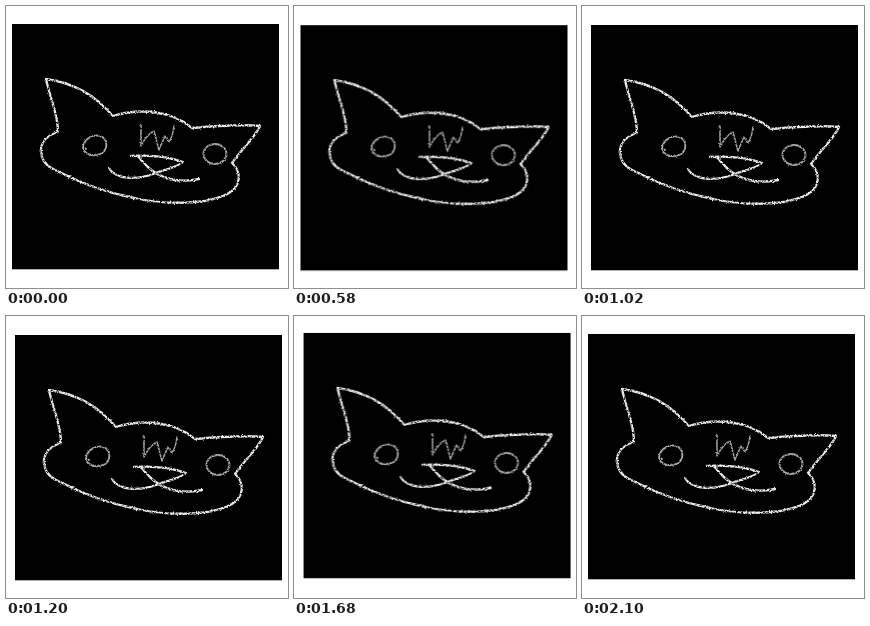
Animation, 282 px wide and 282 px high, one loop 2.12 s. Source, as an HTML page:

```html
<!DOCTYPE html>
<html lang="en">
<head>
<meta charset="utf-8">
<title>Chalk cat</title>
<style>
  html, body { margin: 0; width: 100%; height: 100%; overflow: hidden; background: #fff; }
  svg { display: block; width: 282px; height: 282px; overflow: visible; will-change: transform;
        animation: shake 2120ms ease-in-out infinite; }
  .chalk { fill: none; stroke: #ececec; stroke-width: 2.3; stroke-linecap: round; stroke-linejoin: round; filter: url(#grain); }
  .eye { stroke: #a8a8a8; stroke-width: 1.9; }
  .mark { stroke: #a4a4a4; stroke-width: 1.6; }
  @keyframes shake {
    0%, 99.06%, 100% { transform: translate(0, 0); }
    4.72%  { transform: translate(2.5px, -1.8px); }
    9.43%  { transform: translate(.3px, 2.4px); }
    15.09% { transform: translate(2px, 1px); }
    20.28% { transform: translate(3.2px, -1px); }
    25.47% { transform: translate(1px, 2px); }
    30.19% { transform: translate(-.5px, -.5px); }
    34.91% { transform: translate(3.2px, -1.8px); }
    38.68% { transform: translate(2px, 0); }
    43.4%  { transform: translate(.5px, 2.4px); }
    48.11% { transform: translate(3px, 1px); }
    51.89% { transform: translate(.2px, -1.8px); }
    56.6%  { transform: translate(3px, 1px); }
    61.32% { transform: translate(.3px, -.5px); }
    66.04% { transform: translate(1.5px, -1.5px); }
    70.75% { transform: translate(3px, 2.3px); }
    75.47% { transform: translate(.5px, 0); }
    80.19% { transform: translate(3.8px, -1.2px); }
    86.79% { transform: translate(1px, 1px); }
    91.51% { transform: translate(2.6px, 2.3px); }
    95.28% { transform: translate(1px, -1px); }
  }
</style>
</head>
<body>
<svg viewBox="0 0 282 282">
  <filter id="grain" filterUnits="userSpaceOnUse" x="0" y="0" width="282" height="282" color-interpolation-filters="sRGB">
    <feTurbulence type="fractalNoise" baseFrequency=".55" numOctaves="2" seed="7" result="noise"/>
    <feDisplacementMap in="SourceGraphic" in2="noise" scale="2.4" xChannelSelector="R" yChannelSelector="G" result="rough"/>
    <feColorMatrix in="noise" values="0 0 0 0 1  0 0 0 0 1  0 0 0 0 1  0 0 4 0 -.95" result="holes"/>
    <feComposite in="rough" in2="holes" operator="in"/>
  </filter>
  <rect x="6" y="18" width="267" height="245.3"/>
  <g class="chalk">
    <!-- head and ears -->
    <path d="M52 126 C52 108 44 92 40 73 C64 76 88 88 107 110
             C133 102 165 104 186 122 C208 120 233 118 254 120 C250 130 235 144 226 157
             C236 166 235 180 223 187 C202 199 159 199 128 192 C96 186 70 175 47 163
             C31 155 29 133 52 126"/>
    <!-- nose and mouth -->
    <path d="M125 150 C143 149 163 151 177 156 C170 162 160 163 150 167 C130 175 109 173 103 162"/>
    <path d="M132 150 C141 162 157 180 193 173"/>
    <g class="eye">
      <path d="M77 142 C78 133 86 128 94 130 C103 133 102 145 94 148 C87 151 78 148 77 142 L80 143"/>
      <ellipse cx="209" cy="148" rx="11.5" ry="10"/>
    </g>
    <path class="mark" d="M135 119 L135 140 Q141 128 148 125 L153 144 L159 130 L163 136 Q167 130 168 120"/>
  </g>
</svg>
</body>
</html>
```
